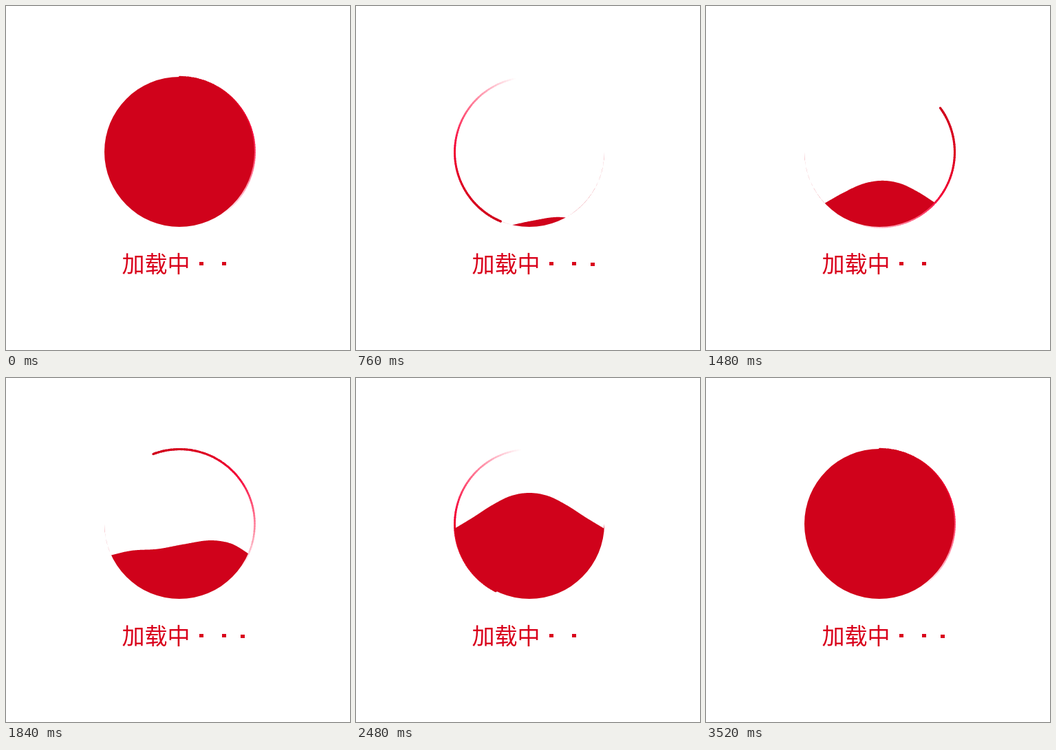
These frames come from a looping animation (500x500 px, 3.76 s). An HTML page with a canvas:

```html
<!DOCTYPE html>
<html lang="zh-CN">
<head>
<meta charset="utf-8">
<title>加载中</title>
<style>
  html, body { margin: 0; width: 100%; height: 100%; overflow: hidden; background: #fff; }
  canvas, svg { position: absolute; left: 0; top: 0; width: 500px; height: 500px; }
  svg { fill: #d9001b; }
  text { font: 400 33px "Noto Sans CJK SC", "Noto Sans CJK", sans-serif; }
</style>
</head>
<body>
<canvas id="stage" width="500" height="500"></canvas>
<svg viewBox="0 0 500 500">
  <text x="168.5" y="386.5">加载中</text>
  <rect x="281" y="372" width="6" height="5"/>
  <rect x="314" y="372" width="6" height="5"/>
  <rect id="dot" x="341" y="373" width="6" height="5"/>
</svg>
<script>
const ctx = document.getElementById('stage').getContext('2d');
const dot = document.getElementById('dot');

const LOOP = 3760, STEP = 40, LAST = 88, TURN_END = 87;
const CX = 252, CY = 212, R = 109;
const RED = '#d0021b';
const WAVE_PERIOD = 26;

// Mean liquid level (y) over time, in steps.
const LEVEL = [[1, 350], [9, 337.5], [28, 301], [46, 246.5], [62, 188], [72, 151], [87, 95]];

// Drop below the crest, sampled from the crest to the rim.
const HUMP = [0, 4.5, 18, 35.5, 52];
const LONG = [0, 5.5, 12.5, 15, 24];
const SHORT = [0, 1.3, 5.5, 14.5, 26];

// Ring colours by degrees behind the head.
const TAIL = [
  [0, [208, 0, 27]], [40, [222, 0, 34]], [70, [244, 0, 52]],
  [95, [255, 84, 120]], [120, [255, 165, 184]], [146, [255, 255, 255]]
];
const TAIL_LEN = 146;

const mix = (a, b, k) => a + (b - a) * k;
const mixAll = (a, b, k) => a.map((v, i) => mix(v, b[i], k));

function lookup(table, x, blend) {
  let i = 0;
  while (i < table.length - 2 && x > table[i + 1][0]) i++;
  const [x0, a] = table[i], [x1, b] = table[i + 1];
  const k = Math.min(1, Math.max(0, (x - x0) / (x1 - x0)));
  return blend(a, b, k);
}

// Smooth curve through evenly spaced samples, flat at the crest.
function sample(p, v) {
  const x = Math.min(1, Math.max(0, v)) * (p.length - 1);
  const i = Math.min(p.length - 2, Math.floor(x)), k = x - i;
  const b = p[i], c = p[i + 1];
  const a = i ? p[i - 1] : c, d = i + 2 < p.length ? p[i + 2] : 2 * c - b;
  const m0 = (c - a) / 2, m1 = (d - b) / 2;
  return b + k * (m0 + k * (3 * (c - b) - 2 * m0 - m1 + k * (2 * (b - c) + m0 + m1)));
}

const mean = p => (p[0] / 2 + p[1] + p[2] + p[3] + p[4] / 2) / 4;

// Surface offset from the mean level; s is the crest place, -1 left to 1 right.
function surface(s) {
  const c = 0.42 * s, k = Math.abs(s);
  const left = mixAll(HUMP, s > 0 ? LONG : SHORT, k);
  const right = mixAll(HUMP, s > 0 ? SHORT : LONG, k);
  const avg = (mean(left) * (1 + c) + mean(right) * (1 - c)) / 2;
  return u => (u < c ? sample(left, (c - u) / (1 + c)) : sample(right, (u - c) / (1 - c))) - avg;
}

function waveAt(step) {
  const p = (step - 28 + 2 * WAVE_PERIOD) % WAVE_PERIOD;
  if (p < 8) return surface(p / 8 - 1);
  if (p < 18) return surface((p - 8) / 10);
  const a = surface(1), b = surface(-1), k = (p - 18) / 8;
  return u => mix(a(u), b(u), k);
}

function drawRing(step) {
  const x = 252.5, y = 212.5, rad = Math.PI / 180;
  const head = -90 - 720 * Math.min(step, TURN_END) / TURN_END;
  const colour = d => `rgb(${lookup(TAIL, d, mixAll).map(Math.round)})`;
  for (let d = TAIL_LEN - 2; d >= 0; d -= 2) {
    ctx.beginPath();
    ctx.arc(x, y, R, (head + d) * rad, (head + d + 2.6) * rad);
    ctx.lineWidth = mix(3.3, 2.4, d / TAIL_LEN);
    ctx.strokeStyle = colour(d + 1);
    ctx.stroke();
  }
  ctx.beginPath();
  ctx.arc(x + R * Math.cos(head * rad), y + R * Math.sin(head * rad), 1.65, 0, 7);
  ctx.fillStyle = colour(0);
  ctx.fill();
}

function drawLiquid(step) {
  ctx.fillStyle = RED;
  if (step === 0 || step >= TURN_END) {
    ctx.beginPath();
    ctx.arc(CX, CY, R, 0, 7);
    ctx.fill();
    return;
  }
  const level = lookup(LEVEL, step, mix), wave = waveAt(step);
  // Follow the surface, held inside the disc, then close along the lower rim.
  ctx.beginPath();
  for (let x = -R; x <= R; x++) {
    const rim = Math.sqrt(R * R - x * x);
    const y = level + wave(x / R);
    ctx.lineTo(CX + x, Math.min(CY + rim, Math.max(CY - rim, y)));
  }
  ctx.arc(CX, CY, R, 0, Math.PI);
  ctx.closePath();
  ctx.fill();
}

function draw(now) {
  const step = Math.min(LAST, Math.floor((now % LOOP) / STEP));
  ctx.clearRect(0, 0, 500, 500);
  drawRing(step);
  drawLiquid(step);
  dot.style.visibility = Math.floor(step * STEP / 500) % 2 ? 'visible' : 'hidden';
}

let start;
function tick(now) {
  start ??= now;
  draw(now - start);
  requestAnimationFrame(tick);
}
draw(0);
requestAnimationFrame(tick);
</script>
</body>
</html>
```
